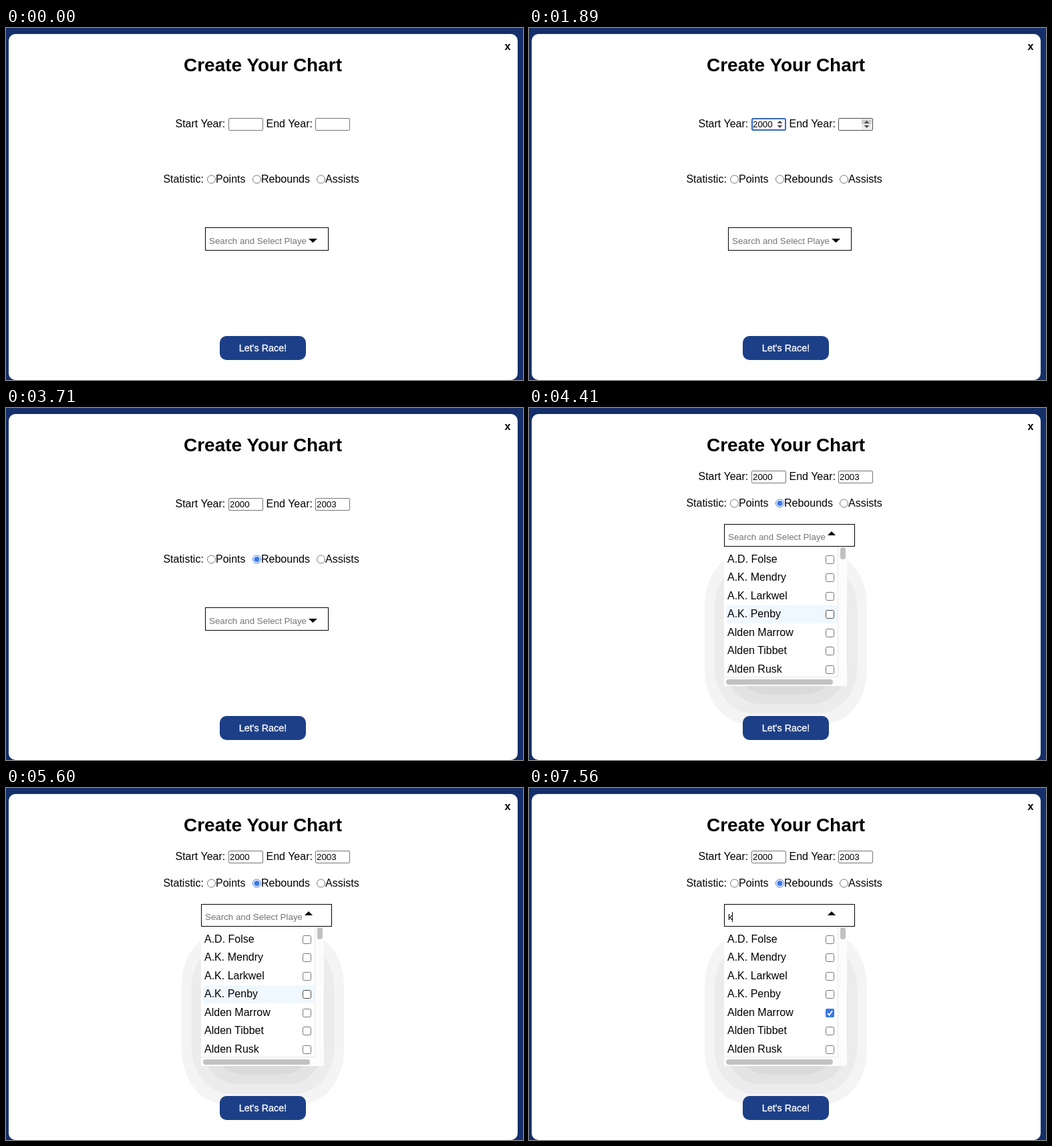
An HTML page for the animation above (8000 ms loop, 774 px wide and 528 px high).

```html
<!DOCTYPE html>
<html lang="en">
<head>
<meta charset="utf-8">
<title>Create Your Chart</title>
<style>
  html, body { margin: 0; width: 100%; height: 100%; overflow: hidden; background: #142f69; }
  svg { display: block; width: 774px; height: 528px; }
  text { font: 16px "Liberation Sans", Arial, sans-serif; white-space: pre; }
  .title { font-size: 28px; font-weight: bold; text-anchor: middle; }
  .close { font-weight: bold; text-anchor: middle; }
  .small { font-size: 13.333px; }
  .hint { fill: #757575; }
  .go { font-size: 14.4px; fill: #fff; stroke: #fff; stroke-width: .3px; text-anchor: middle; }
</style>
</head>
<body>
<svg id="stage" viewBox="0 0 774 528"></svg>
<script>
const LOOP = 8000, OPEN = 4410;
const BLUE = '#3b78e8', GREY = '#767676', DARK = '#4a4a4a';
const PLAYERS = ['A.D. Folse', 'A.K. Mendry', 'A.K. Larkwel', 'A.K. Penby',
                 'Alden Marrow', 'Alden Tibbet', 'Alden Rusk'];

// Each track lists [start time, value]; the value holds until the next one.
const START = [[0, ''], [1330, '20'], [1400, '2000']];
const END = [[0, ''], [2520, '2'], [2590, '20'], [2730, '200'], [2800, '2003']];
const HOVER_ROW = [[0, -1], [4410, 3], [4620, 2], [4690, 1], [4760, 0], [5180, 1], [5320, 2],
                   [5600, 3], [5810, 4], [6090, 3], [6160, 2], [6230, 1], [6300, 0], [6370, -1]];

const at = (track, t) => track.filter(cue => cue[0] <= t).pop()[1];
const within = (t, ...spans) => spans.some(([a, b]) => t >= a && t < b);

const rect = (x, y, w, h, fill, extra = '') =>
  `<rect x="${x}" y="${y}" width="${w}" height="${h}" fill="${fill}" ${extra}/>`;
const frame = (x, y, w, h, stroke, r = 0) =>
  rect(x + .5, y + .5, w - 1, h - 1, '#fff', `rx="${r}" stroke="${stroke}"`);
const text = (x, y, str, cls = '') => `<text x="${x}" y="${y}" class="${cls}">${str}</text>`;
const poly = (points, fill = '#000') => `<polygon points="${points}" fill="${fill}"/>`;
const caret = (x, y) => rect(x, y, 1, 15, '#000');

function spinner(x, y, hover, up) {
  const cx = x + 42.5;
  return (hover ? rect(x + 35, y + 2, 15, 15, '#ebebeb') : '') +
    (up ? rect(x + 35, y + 2, 15, 7, '#cecece') : '') +
    poly(`${cx - 4},${y + 8} ${cx + 4},${y + 8} ${cx},${y + 4}`, DARK) +
    poly(`${cx - 4},${y + 11} ${cx + 4},${y + 11} ${cx},${y + 15}`, DARK);
}

function yearField(x, y, o) {
  const box = o.focus
    ? rect(x + 1, y + 1, 50, 17, '#fff', 'rx="1.5" stroke="#3565c4" stroke-width="2"')
    : frame(x, y, 52, 19, o.hover ? DARK : GREY, 1.5);
  return box + (o.focus || o.hover ? spinner(x, y, o.spin, o.up) : '') +
    text(x + 2, y + 14, o.value, 'small') +
    (o.caret ? caret(Math.floor(x + 2 + o.value.length * 7.415), y + 2) : '');
}

function radio(x, y, label, checked, hover) {
  const ring = checked ? (hover ? '#2a5fc8' : BLUE) : hover ? DARK : GREY;
  return `<circle cx="${x + 6.5}" cy="${y}" r="6" fill="#fff" stroke="${ring}"/>` +
    (checked ? `<circle cx="${x + 6.5}" cy="${y}" r="4" fill="${ring}"/>` : '') +
    text(x + 13, y + 5, label);
}

function checkbox(x, y, checked, hover) {
  if (!checked) return frame(x, y, 13, 13, hover ? DARK : GREY, 2);
  return rect(x, y, 13, 13, hover ? '#2a5fc8' : BLUE, 'rx="2"') +
    `<path d="M${x + 3} ${y + 6.8}l2.5 2.7 4.6-6.3" fill="none" stroke="#fff" stroke-width="1.8"/>`;
}

function years(t, y) {
  return text(253.5, y + 14, 'Start Year:') +
    yearField(333, y, {
      value: at(START, t), focus: within(t, [1050, 2380]), caret: within(t, [1050, 1890]),
      spin: within(t, [1050, 1610])
    }) +
    text(389.5, y + 14, 'End Year:') +
    yearField(463, y, {
      value: at(END, t), focus: within(t, [2380, 3500]), hover: within(t, [1610, 2380]),
      caret: within(t, [2380, 3360]), spin: within(t, [1890, 2380], [2940, 3010]),
      up: within(t, [1890, 2380], [2940, 3010])
    });
}

function stats(t, y) {
  return text(235.4, y + 5, 'Statistic:') + radio(301, y, 'Points') +
    radio(369, y, 'Rebounds', t >= 3500, within(t, [3150, 3710])) + radio(465, y, 'Assists');
}

function shadow() {
  return ['#f4f4f4', '#ececec', '#e3e3e3', '#dadada'].map((shade, i) => {
    const d = i * 14.5;
    return rect(263 + d, 216 + d, 243 - 2 * d, 257 - 2 * d, shade,
      `rx="${62 - i * 4}" ry="${80 - i * 9}"`);
  }).join('');
}

function list(t) {
  const hot = at(HOVER_ROW, t);
  const rows = PLAYERS.map((name, i) => {
    const y = 213.5 + i * 27.5;
    return (i === hot ? rect(295, Math.floor(y), 167, 27, '#f0f8ff') : '') +
      text(297, Math.round(y + 18), name) +
      checkbox(444, Math.round(y + 7), i === 4 && t >= 6020, i === hot);
  }).join('');
  return shadow() + rect(292, 208, 184, 209, '#fff') + rows +
    rect(462, 208, 14, 209, '#fcfcfc') + rect(292, 403, 184, 14, '#fcfcfc') +
    rect(462, 208, 1, 196, '#e9e9e9') + rect(292, 403, 171, 1, '#e9e9e9') +
    rect(466, 209, 8, 18, '#c1c1c1', 'rx="4"') + rect(295, 407, 160, 8, '#c1c1c1', 'rx="4"');
}

function search(t) {
  const hint = 'Search and Select Playe';
  if (t < OPEN)
    return frame(298, 299, 185, 35, '#000') + text(304, 324, hint, 'small hint') +
      poly('453,316 466,316 459.5,322');
  const typed = t >= 7560;
  const blink = within(t, [4970, 5460], [6020, 6580], [7140, 7560]);
  return list(t) + frame(292, 174, 196, 34, '#000') +
    (typed ? text(298, 198, 'k', 'small') + caret(304, 186) : text(298, 198, hint, 'small hint')) +
    (blink ? caret(298, 186) : '') + poly('447,191 459,191 453,185');
}

function scene(t) {
  const open = t >= OPEN;
  return rect(0, 0, 774, 528, '#142f69') + rect(4, 9, 762, 519, '#fff', 'rx="10"') +
    text(751, 33, 'x', 'close') + text(384.5, 65, 'Create Your Chart', 'title') +
    years(t, open ? 94 : 135) + stats(t, open ? 143 : 227) + search(t) +
    rect(320, 462, 129, 36, '#1c3f87', 'rx="10"') + text(384.5, 485, "Let's Race!", 'go');
}

const stage = document.getElementById('stage');
let shown = '';
function tick() {
  const next = scene(performance.now() % LOOP);
  if (next !== shown) stage.innerHTML = shown = next;
  requestAnimationFrame(tick);
}
tick();
</script>
</body>
</html>
```
